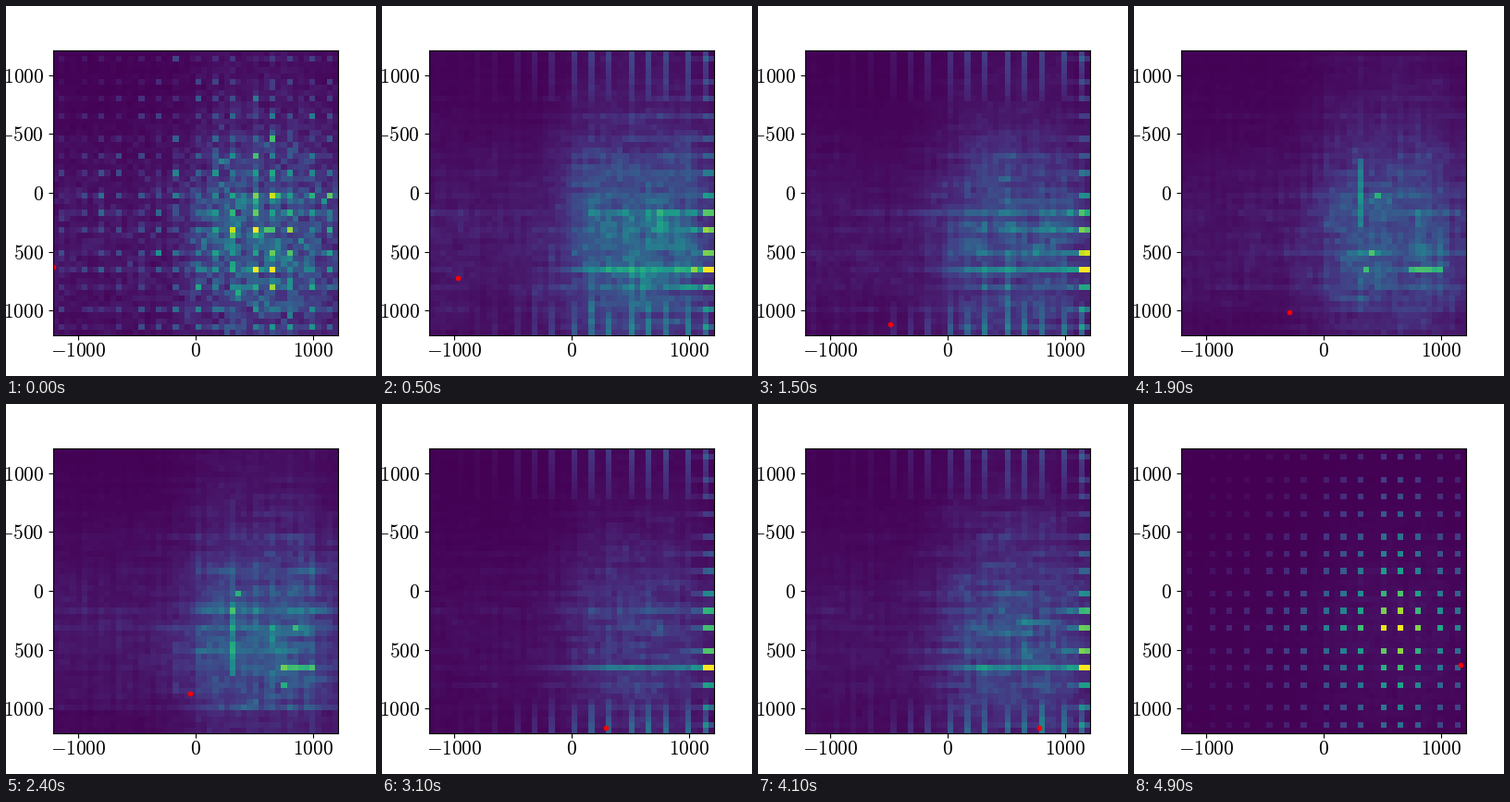
Write a matplotlib script that moves like this. It is 400 px wide and 400 px high and loops after 5 s.

```python
import numpy as np
import matplotlib.pyplot as plt
from matplotlib.animation import FuncAnimation

plt.rcParams.update({"mathtext.fontset": "cm", "font.size": 15.4})

N = 50
FRAMES = N
HALF = 1212.5
CELL = 2 * HALF / N
LATTICE = np.round(1.3 + 3.34 * np.arange(15)).astype(int)
MAIN_ROW, MAIN_COL = 38, 37

index = np.arange(N)
on_lattice = np.isin(index, LATTICE)


def sigmoid(x):
    return 1 / (1 + np.exp(-x))


def bell(center, width):
    return np.exp(-((index - center) / width) ** 2)


def tent(center, width):
    return np.exp(-np.abs(index - center) / width)


RIGHT_SIDE = sigmoid((index - 25) / 2.5) * (1 - 0.6 * sigmoid(index - 46))
CLOUD = np.outer(0.1 + 0.9 * bell(33, 17), 0.2 + 0.8 * RIGHT_SIDE)
DOTS = 1.08 * np.outer(tent(31, 16) * on_lattice, tent(MAIN_COL, 12) * on_lattice)
EDGE = (0.12 + 0.5 * bell(34, 11)) * on_lattice
EDGE[MAIN_ROW] = 0.9
END_COLS = sigmoid((index - 22) / 6) * on_lattice


def streaks(rng, axis, length):
    noise = rng.standard_normal((N, N))
    return sum(np.roll(noise, k, axis) for k in range(length)) / np.sqrt(length)


def add_grid(field, rng, first):
    if first:
        field += 0.4 * np.sqrt(DOTS) * rng.lognormal(-0.1, 0.5, (N, N))
    else:
        field += DOTS


def add_edges(field):
    field[:, 48:] += EDGE[:, None]
    field[:, 46:48] += 0.25 * EDGE[:, None]
    field[MAIN_ROW] += 0.22 * RIGHT_SIDE
    field[:9] += 0.18 * np.linspace(1, 0.3, 9)[:, None] * END_COLS
    field[44:] += 0.28 * np.linspace(0.2, 1, 6)[:, None] * END_COLS


def add_hot_runs(field, rng):
    start = rng.integers(34, 43)
    field[MAIN_ROW, start:start + 6] += 0.4
    top = rng.integers(16, 34)
    field[top:top + 12, rng.choice(LATTICE[9:13])] += 0.2
    for row in rng.choice(LATTICE[6:14], 3):
        field[row, rng.integers(32, 44)] += 0.35
    field[46:] *= 0.7


def heatmap(frame):
    rng = np.random.default_rng(70 + frame)
    first, last = frame == 0, frame == FRAMES - 1
    level = 0.035 if last else np.interp(frame, [0, 10, 15, 24, 31, 41],
                                         [.29, .38, .24, .28, .15, .23])
    noise = 0.15 * streaks(rng, 1, 6) + 0.12 * streaks(rng, 0, 6)
    noise += (0.3 if first else 0.08) * streaks(rng, 1, 1)
    row_lines = 1 + 0.4 * on_lattice * rng.random(N)
    col_lines = 1 + 0.25 * on_lattice * rng.random(N)
    field = level * CLOUD * np.outer(row_lines, col_lines) * np.exp(noise)

    if first or last:
        add_grid(field, rng, first)
    elif on_lattice[frame]:
        add_edges(field)
    else:
        add_hot_runs(field, rng)
    return np.clip(field, 0, 1)


def marker_place(frame):
    row = round(np.interp(frame, [0, 10, 15, 24, 31, 41, 49],
                          [38, 41, 48, 43, 49, 49, 38]))
    return [frame * CELL - HALF], [row * CELL - HALF]


fig, ax = plt.subplots(figsize=(4, 4), dpi=100)
image = ax.imshow(heatmap(0), cmap="viridis", vmin=0, vmax=1,
                  extent=(-HALF, HALF, HALF, -HALF))
marker, = ax.plot(*marker_place(0), "r.", markersize=6)
ax.set_xlim(-HALF, HALF)
ax.set_ylim(HALF, -HALF)
for axis, step in ((ax.xaxis, 1000), (ax.yaxis, 500)):
    ticks = range(-1000, 1001, step)
    axis.set_ticks(ticks, [f"${v}$" for v in ticks])
ax.tick_params(axis="x", pad=1.5)


def update(frame):
    image.set_data(heatmap(frame))
    marker.set_data(*marker_place(frame))
    return image, marker


anim = FuncAnimation(fig, update, frames=FRAMES, interval=100, repeat=True, repeat_delay=0)
plt.show()
```
